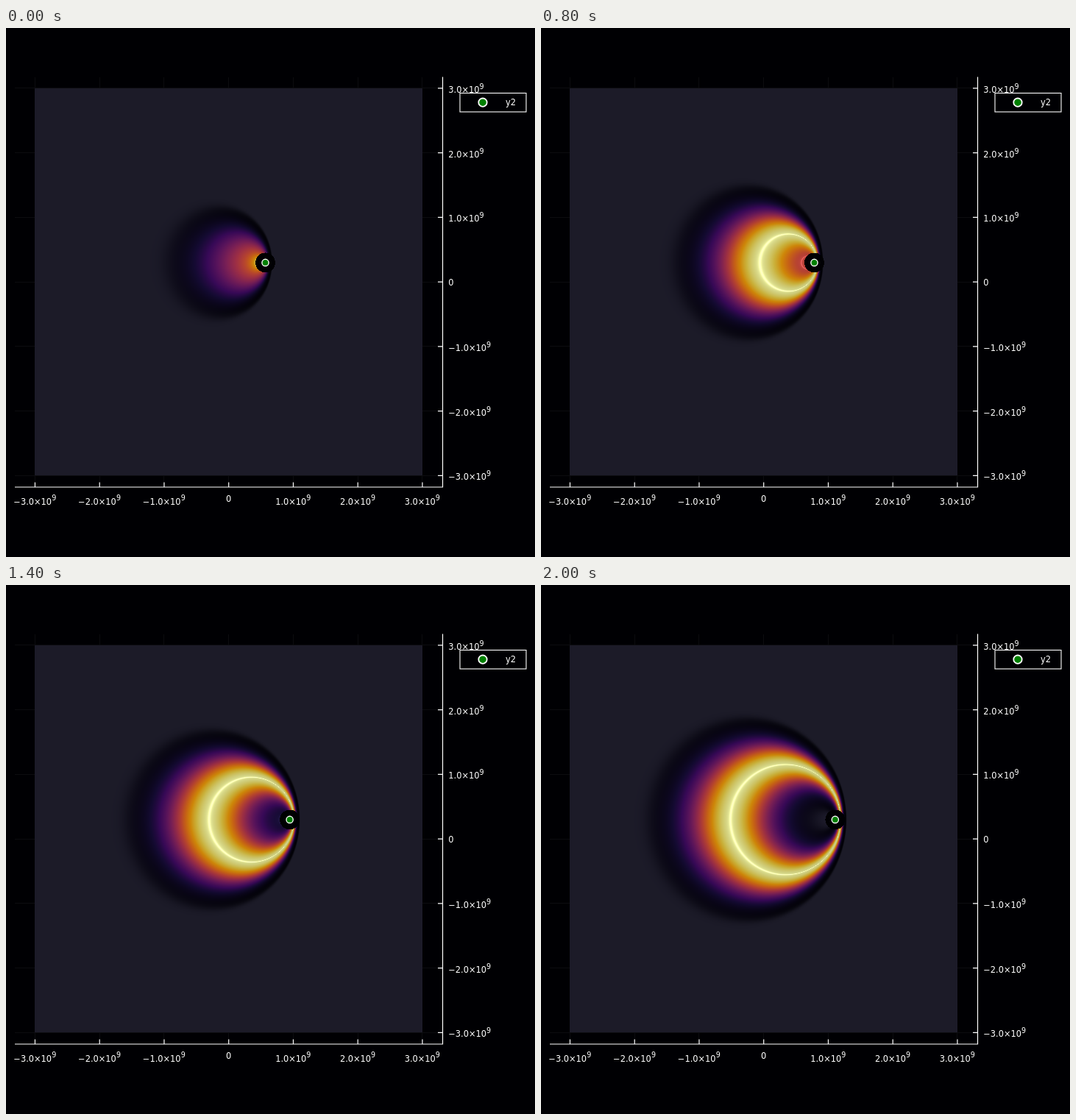
An HTML page with a canvas for the animation above (2.1 s loop, 719 by 719 pixels).

```html
<!DOCTYPE html>
<html lang="en">
<head>
<meta charset="utf-8">
<title>Field of a fast moving charge</title>
<style>
html, body { margin: 0; width: 100%; height: 100%; overflow: hidden; background: #000003; }
canvas, svg { position: absolute; left: 0; top: 0; }
text { font-family: "DejaVu Sans", sans-serif; font-size: 11.4px; fill: #fff; }
.sup { font-size: 9.6px; }
.axis { stroke: #fff; stroke-width: 1.2; fill: none; }
.dot { fill: #008000; stroke: #fff; }
</style>
</head>
<body>
<canvas id="stage" width="719" height="719"></canvas>
<svg id="overlay" width="719" height="719">
  <path class="axis" d="M12 624H593.5V66.5"/>
  <g id="ticks"></g>
  <rect x="617" y="88.5" width="90" height="25.5" fill="#000003" stroke="#fff" stroke-width="1.1"/>
  <circle class="dot" cx="648" cy="101.2" r="5.7" stroke-width="1.8"/>
  <text x="679" y="105.4">y2</text>
  <circle class="dot" id="charge" cy="318.9" r="4.6" stroke-width="1.4"/>
</svg>
<script>
const ctx = document.getElementById("stage").getContext("2d");
const charge = document.getElementById("charge");
const UNIT = 87.75, X0 = 302.7, Y0 = 345.2;   // pixels per 1e9, origin
const STEP_MS = 100, STEPS = 21;
const LIGHT = 2.63, BETA = 0.9, GAMMA2 = 1 / (1 - BETA * BETA);
const CHARGE_X = 352.5, CHARGE_Y = 318.9, HOLE = 13.4;
const PEAK = -10.3, SIGMA = 7.2;              // emission pulse, in steps
const BOX = { x: 110, y: 150, w: 330, h: 340 };
const RAMP = [
  [0, 0, 4], [22, 11, 57], [66, 10, 104], [106, 23, 110], [147, 38, 103], [188, 55, 84],
  [221, 81, 58], [243, 120, 25], [252, 165, 10], [246, 215, 70], [252, 255, 164]
];
const GLOSS = [28, 27, 36];

function label(value, x, y, centred) {
  if (!value) return `<text x="${centred ? x - 3.6 : x}" y="${centred ? y - 4 : y - 1.6}">0</text>`;
  const base = (value < 0 ? "−" : "") + Math.abs(value) + ".0×10";
  const width = value < 0 ? 51.8 : 42.2;
  const left = centred ? x - (width + 6.4) / 2 : x;
  const rise = centred ? 6.5 : 5.2;
  return `<text x="${left}" y="${y}">${base}</text>` +
    `<text class="sup" x="${left + width}" y="${y - rise}">9</text>`;
}

function drawStatic() {
  let ticks = "";
  ctx.fillStyle = "#0c0c0f";
  for (let v = -3; v <= 3; v++) {
    const x = X0 + v * UNIT, y = Y0 - v * UNIT;
    ctx.fillRect(Math.floor(x), 67, 1, 557);
    ctx.fillRect(12, Math.floor(y), 581, 1);
    ticks += `<path class="axis" d="M${x} 624v-6.5M593.5 ${y}h-6.5"/>` +
      label(v, x, 648, true) + label(v, 601.3, y + 6, false);
  }
  document.getElementById("ticks").innerHTML = ticks;
  ctx.fillStyle = "#1c1b28";
  ctx.fillRect(39, 82, 527, 526);
}

// Pulse strength at retarded distance r
function strength(r, step) {
  const u = (step - r / LIGHT - PEAK) / SIGMA;
  return Math.exp(-u * u / 2) / r;
}

function retardedDistance(dx, dy) {
  return GAMMA2 * (BETA * dx + Math.sqrt(dx * dx + dy * dy / GAMMA2));
}

function drawField(step) {
  const cx = CHARGE_X + BETA * LIGHT * step;
  let top = 0;
  for (let r = 6; r < 150; r += 0.25) top = Math.max(top, strength(r, step));
  const height = (dx, dy) => Math.min(1, strength(Math.max(retardedDistance(dx, dy), 1), step) / top);

  const image = ctx.createImageData(BOX.w, BOX.h), data = image.data;
  for (let j = 0, p = 0; j < BOX.h; j++) {
    for (let i = 0; i < BOX.w; i++, p += 4) {
      const dx = BOX.x + i + 0.5 - cx, dy = BOX.y + j + 0.5 - CHARGE_Y;
      data[p + 3] = 255;
      if (Math.hypot(dx, dy) < HOLE) {
        data[p + 2] = 3;
        continue;
      }
      const v = height(dx, dy);
      const slope = Math.hypot(height(dx + 0.5, dy) - height(dx - 0.5, dy),
                               height(dx, dy + 0.5) - height(dx, dy - 0.5));
      const facing = 1 / Math.hypot(1, 1000 * slope);   // surface lit from above
      const k = Math.min(9, Math.floor(v * 10)), f = v * 10 - k;
      for (let c = 0; c < 3; c++) {
        const tint = RAMP[k][c] + (RAMP[k + 1][c] - RAMP[k][c]) * f;
        data[p + c] = tint * (0.8 + 0.2 * facing) + GLOSS[c] * facing * facing;
      }
    }
  }
  ctx.putImageData(image, BOX.x, BOX.y);
  charge.setAttribute("cx", cx);
}

let shown = -1;
const start = performance.now();
function tick() {
  const step = Math.floor((performance.now() - start) / STEP_MS) % STEPS;
  if (step !== shown) drawField(shown = step);
  requestAnimationFrame(tick);
}
drawStatic();
tick();
</script>
</body>
</html>
```
